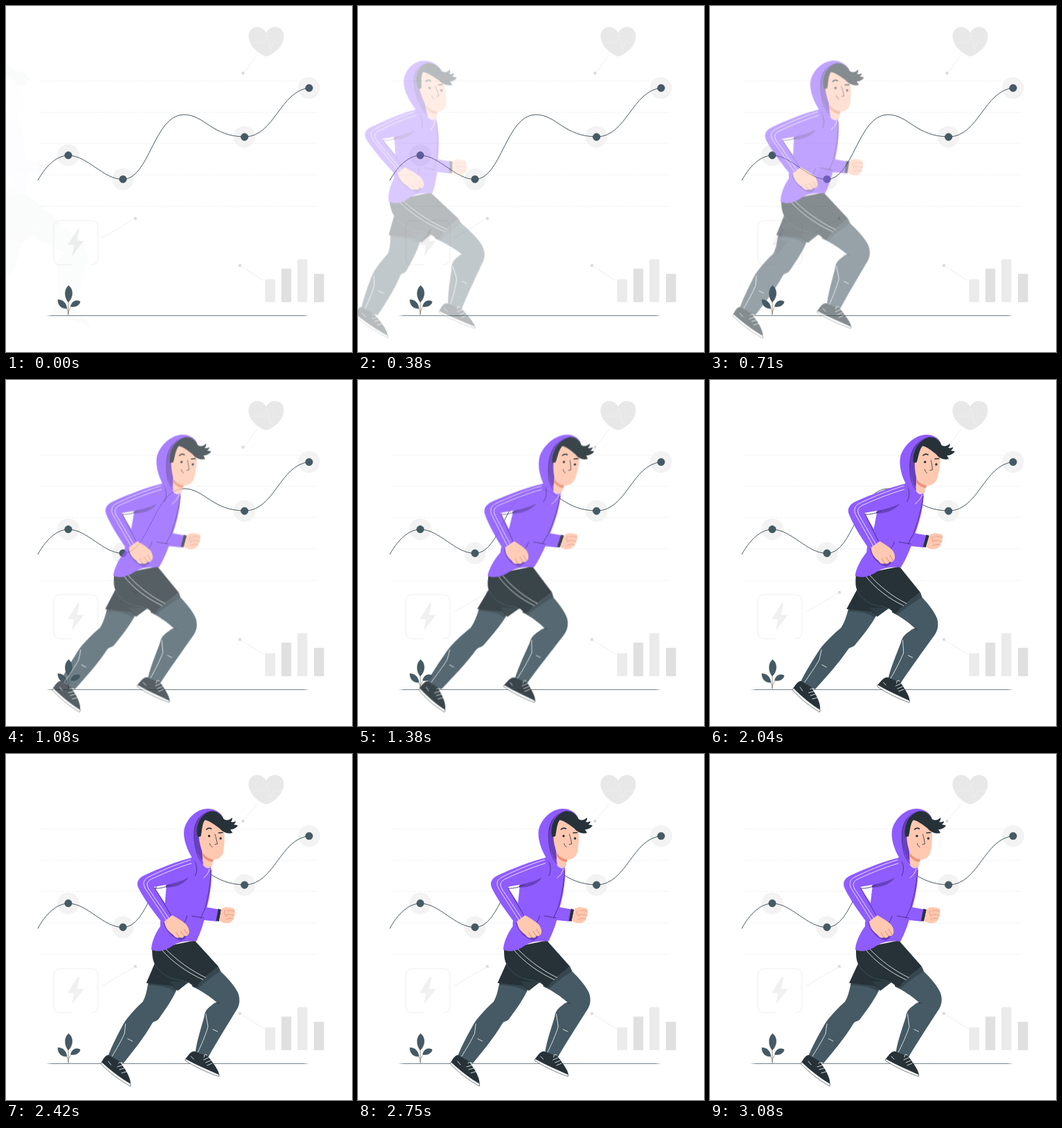
Recreate the animation shown at these times as an HTML page. Size 500 by 500 pixels, loop 3120 ms.

```html
<!DOCTYPE html>
<html lang="en">
<head>
<meta charset="utf-8">
<title>Runner and chart</title>
<style>
  html, body { margin: 0; width: 100%; height: 100%; overflow: hidden; background: #fff; }
  svg { display: block; width: 100%; height: 100%; }
  .line { fill: none; stroke-linecap: round; stroke-linejoin: round; }
  .white { stroke: #fff; stroke-width: .8; }
  .dark { stroke: #263238; stroke-width: .8; }
  .pale { stroke: #ebebeb; stroke-width: .8; }
  .hoodie { fill: #8f5cff; }
  .shade { fill: #6741bd; }
  .skin { fill: #ffc8b0; }
  .black { fill: #263238; }
  .slate { fill: #455a64; }
</style>
</head>
<body>
<svg viewBox="0 0 500 500">
  <g id="grid" class="line" stroke="#efefef" stroke-width=".9" stroke-dasharray="1.6 2.4"></g>

  <!-- heart -->
  <path fill="#e8e8e8" d="M376 73C366 70 350 58 350.500 43C351 29 369 25 376 39C383 25 401 29 401.500 43C402 58 386 70 376 73Z"/>
  <path class="line" stroke="#f0f0f0" stroke-width=".8" d="M357 53H366L369 50L372 54L377 42L382 63L387 50L389 53H397"/>
  <path class="line pale" d="M363 71L343 97M139 335L187 307M338 375L373 397"/>
  <g fill="#dcdcdc">
    <circle cx="342.500" cy="97" r="2.200"/><circle cx="187" cy="307" r="2.200"/><circle cx="338" cy="375" r="2.200"/>
  </g>

  <!-- bolt card -->
  <path class="line pale" d="M95 374H79Q69 374 69 364V320Q69 310 79 310H123Q133 310 133 320V364Q133 374 123 374"/>
  <path fill="#f0f0f0" d="M104 322L89 345.500H98.500L95 362L112.500 339.500H102.500L106.500 322Z"/>

  <!-- bars -->
  <g fill="#ebebeb"><rect x="374.500" y="395" width="14.500" height="33" rx="1"/><rect x="421" y="366" width="14.500" height="62" rx="1"/></g>
  <g fill="#e0e0e0"><rect x="398" y="379.500" width="14.300" height="48.500" rx="1"/><rect x="445" y="387" width="14.500" height="41" rx="1"/></g>

  <!-- chart -->
  <g id="halos" fill="#f3f3f3"></g>
  <path class="line" stroke="#455a64" d="M46 252C58 230 74 216 90 216C118 216 140 250.500 169 250.500C207 250.500 214 157 257 157C287 157 297 188.500 345 189C388 189 396 122 438 118.500"/>
  <g id="dots" class="slate" stroke="#37474f" stroke-width=".6"></g>

  <!-- ground and plant -->
  <path class="slate" d="M58 447.400L66 447.050H430L438 447.400L430 447.750H66Z"/>
  <path class="line" stroke="#8a8178" stroke-width=".8" d="M90 447V424M90 445C90 438 86 436 82 432M90 445C90 437 95 433 100 430"/>
  <g class="slate" stroke="#37474f" stroke-width=".5">
    <path d="M90.500 404C97 409 98 420 90 428C84 421 84 409 90.500 404Z"/>
    <path d="M75 424.500C82 424 87 429 88 437C80 438 75 432 75 424.500Z"/>
    <path d="M107 427C107 432 100 436 93.500 434C95 427 101 424 107 427Z"/>
  </g>

  <g id="runner">
    <!-- far arm -->
    <path class="hoodie" d="M284 220L309 224.500L306 242L278 239Z"/>
    <path class="black" d="M308.500 223.500L313 225L309 242L305 241Z"/>
    <path class="skin" d="M312.500 226C315 221 321 220.500 326 222C331 222 333.500 225 332 228C333 232 331 235 330 238C328 243 324 245 317 244.500L309.500 241.500Z"/>
    <path class="line" stroke="#e58f78" stroke-width=".8" d="M321 227C325 225 329 226 332 228M319 233C323 231 328 232 331 233.500M319 239C323 237 327 237 330 238.500M318 226C316 229 317 233 320 234"/>

    <g transform="translate(1 0)">
      <!-- front leg -->
      <path class="slate" d="M266 330L303 309C313 319 327 333 332 345C336 357 333 365 327 373C315 392 300 414 286 438L267.500 431C271 412 277 396 282 380C283 370 290 364 301 359C291 350 279 342 266 336Z"/>
      <path fill="#37474f" d="M269 337L305 307L308 314C298 320 286 328 275 339Z"/>
      <path class="line" stroke="#263238" stroke-width=".8" d="M295 362Q299 358 305 360"/>
      <path class="line white" d="M284.500 376L287 394C284 404 276 422 271 431M294 398L300.500 401"/>
      <path class="black" d="M266 429.500C260 430 257 436 253 440.500C268 450 286 458 301 465C301 458 295 450 288 440L285 437Z"/>
      <path fill="#fff" stroke="#263238" stroke-width=".6" d="M253 440.500C268 449 285 456 301 463.500L300 466C283 460 266 452 252.500 443Z"/>
      <path class="line white" d="M279 442L286 439M282 446L289 443M284 450L291 447M280 438Q280 432 284 435M261 437L265 441"/>

      <!-- rear leg -->
      <path class="slate" d="M203 329L245 338C237 355 225 371 216 383C213 387 209 385 206 390C194 410 177 430 163 447L141 437C147 422 157 404 165 390C172 379 185 366 194 358C199 350 201 339 203 329Z"/>
      <path fill="#37474f" d="M204 329L246 336L240 343C229 335 217 335 203 334Z"/>
      <path class="line white" d="M168 390L166 404C162 413 153 427 147 437M170.500 411.500L177 415"/>
      <path class="black" d="M142 435C137 435 134 441 131 446C144 459 158 470 172 479C174 471 168 459 160 448L159 445Z"/>
      <path fill="#fff" stroke="#263238" stroke-width=".6" d="M131.500 445C144 457 158 468 172.500 476.500L172 480C156 471 142 460 130.500 448Z"/>
      <path class="line white" d="M154 452L161 450M157 456L164 454M160 461L167 459M156 447Q157 444 160 447M141 444L145 449"/>
    </g>

    <!-- shorts -->
    <path class="black" d="M211 282L273 269.500L306 307C298 314 284 322 274 336L271 337L262 330L246 342L238 335L201 331L214 303C211 297 211 290 211 282Z"/>
    <path fill="#37474f" d="M234 329L262 329L247 342Z" opacity=".55"/>
    <path class="line" stroke="#455a64" stroke-width=".7" d="M214 303C220 317 238 327 253 327M253 327L262 331"/>
    <path class="line white" d="M225 283C240 301 261 316 283 326M231 282C246 298 266 313 287 323"/>

    <!-- torso -->
    <path class="hoodie" d="M273 149L300 162C302 178 298 203 292.500 221C289 240 281 261 275 271C267 270 251 270 241 277C231 284 220 287 210 283C210 273 217 258 224 249C223 236 232 228 232 215L235 189Z"/>
    <path class="shade" d="M234 190C244 184 255 181 267 179C260 188 248 193 234 193Z"/>
    <path class="shade" d="M228 243C232 257 242 267 254 270L261 265L240 244Z"/>
    <path class="line" stroke="#482d87" stroke-width=".9" d="M270 234L287 237M263 234C262 239 260 242 257 246M283 237L290 222C296 201 299 184 300 168"/>

    <!-- near arm -->
    <path class="hoodie" d="M276 149C253 154 224 166 204 175C193 180 191 187 195 195C203 211 216 230 228 245L242 233C236 220 226 207 217 192C228 190 251 187 264 180C276 173 281 163 276 149Z"/>
    <path class="line" stroke="#482d87" stroke-width=".9" d="M276 152C281 163 280 170 277 176M218 194C226 195 234 192 241 189M218 194L240 233"/>
    <path class="line white" d="M271 153C248 160 225 170 209 178C201 182 201 188 204 194L233 240M272 158C249 165 228 174 213 181C206 185 206 189 209 195L237 238"/>
    <path class="skin" d="M230 242L242 233C250 238 258 242 262 247C265 251 267 258 264 261C262 264 259 262 258 263C256 267 252 265 251 265C247 267 244 264 242 261C236 257 231 251 230 242Z"/>
    <path class="line" stroke="#cf7d6b" stroke-width=".8" d="M247 258L251 265M253 256L258 263M258 253L263 261"/>

    <!-- head -->
    <path class="hoodie" d="M298 79C285 79 269 90 263.500 108C260 122 268 142 275 152C279 159 286 164 292 167L301 163L302 146L320 91C315 82 306 79 298 79Z"/>
    <path class="shade" d="M304 82C290 84 279 95 277.500 111C276 127 280 144 287 154L290 146L285 118Z"/>
    <path class="skin" d="M288 139L304 149L302 161C297 166 292 164 289 160Z"/>
    <path fill="#ef9275" d="M289 143C293 149 299 152 304 152L303 156C297 156 292 152 289 148Z"/>
    <path class="skin" d="M288 94L320 102C322 117 321 130 319 140C317 150 309 154 302 152C295 150 289 146 287 137C285 130 284 122 284 114Z"/>
    <path class="black" d="M282.500 120C279 106 286 88 301 83C309 81 317 86 321 94C326 97 330 95 333 92C334 95 332 97 331 98C334 99 336 98 338 97C338 100 336 101 335 102L341 103C339 107 334 109 330 109L333 114C326 116 319 113 315 108C309 103 301 97 294 95C289 101 289 112 287 119Z"/>
    <path class="line dark" stroke-width="1.500" d="M307.500 116C309 121 310 126 310.500 130L307 130.500M299.500 129.500C300 132 301.500 133.500 303 134.500"/>
    <path class="line" stroke="#263238" stroke-width="1.700" d="M295.500 109C298 106.500 300 106.500 302.500 108M313 114L318.500 113.500"/>
    <g class="black"><circle cx="299" cy="118.500" r="1.700"/><circle cx="315.500" cy="122" r="1.700"/></g>
    <path class="line" stroke="#482d87" stroke-width=".8" d="M285 93C277 103 275 120 280 142C282 150 286 155 290 160"/>
    <path class="line white" d="M289 159Q292 168 301 163M298 166Q296 174 289 179"/>
  </g>
</svg>
<script>
const LOOP = 3120, LENGTH = 3100, LEAD = 27;
const ORIGIN_Y = 280;
const byId = id => document.getElementById(id);
const tan = deg => Math.tan(deg * Math.PI / 180);

// position in the run, x offset, skew, opacity
const KEYS = [
  { at: 0, x: -250, skew: tan(20), alpha: 0 },
  { at: .6, x: 0, skew: tan(-10), alpha: 1 },
  { at: .8, x: 0, skew: tan(2), alpha: 1 },
  { at: 1, x: 0, skew: 0, alpha: 1 }
];

byId('grid').innerHTML = [108.5, 153.5, 198.5, 244, 289.5]
  .map(y => `<path d="M51 ${y}H449"/>`).join('');

const points = [[90, 215.7], [169, 250.3], [344.7, 189.2], [438, 118.5]];
const circles = r => points.map(([x, y]) => `<circle cx="${x}" cy="${y}" r="${r}"/>`).join('');
byId('halos').innerHTML = circles(15.8);
byId('dots').innerHTML = circles(5.2);

// cubic-bezier(0, 0, .58, 1)
function easeOut(x) {
  let lo = 0, hi = 1;
  for (let i = 0; i < 24; i++) {
    const s = (lo + hi) / 2;
    if (1.74 * (1 - s) * s * s + s ** 3 < x) lo = s; else hi = s;
  }
  return 3 * (1 - lo) * lo * lo + lo ** 3;
}

function pose(u) {
  const i = u < .6 ? 0 : u < .8 ? 1 : 2;
  const a = KEYS[i], b = KEYS[i + 1];
  const p = easeOut((u - a.at) / (b.at - a.at));
  const mix = key => a[key] + (b[key] - a[key]) * p;
  return { x: mix('x'), skew: mix('skew'), alpha: mix('alpha') };
}

const runner = byId('runner');
function draw(now) {
  const { x, skew, alpha } = pose(Math.min(1, (now % LOOP + LEAD) / LENGTH));
  runner.setAttribute('transform', `matrix(1 0 ${skew} 1 ${x - ORIGIN_Y * skew} 0)`);
  runner.setAttribute('opacity', alpha);
}

const start = performance.now();
function tick() {
  draw(performance.now() - start);
  requestAnimationFrame(tick);
}
tick();
</script>
</body>
</html>
```
